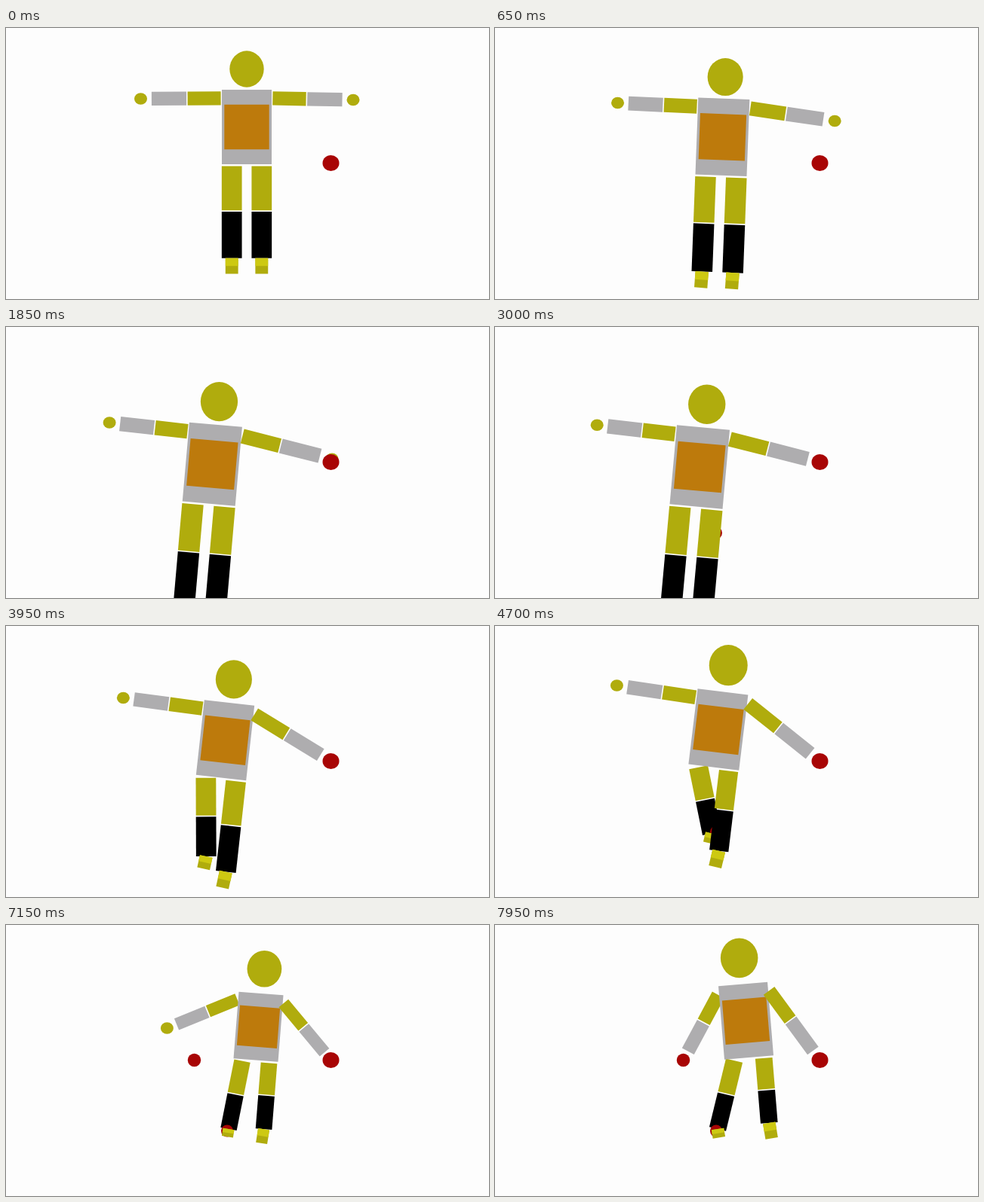
An HTML page with a canvas that plays this animation: 640x360 px, repeating every 8 s.

```html
<!DOCTYPE html>
<html lang="en">
<head>
<meta charset="utf-8">
<title>Reaching figure</title>
<style>
html, body { margin: 0; width: 100%; height: 100%; overflow: hidden; background: #fdfdfd; }
canvas { display: block; width: 100vw; height: 100vh; }
</style>
</head>
<body>
<canvas id="stage" width="640" height="360"></canvas>
<script>
const ctx = document.getElementById('stage').getContext('2d');

const LOOP = 8000, STEP = 50, MOVE = 1950;
const SKIN = '#b0ac0d', LIT = '#cdc912', GREY = '#aeadaf';
const GOLD = '#bd7a0c', RED = '#a80505', BLACK = '#000';

// Balls the figure reaches for, one per move.
const BALL_R = [430.5, 179.5], BALL_FOOT = [293, 273.5], BALL_L = [249.5, 179.5];
const HAND_R = [460, 95.5];

// Body poses: chest top x, y, hip middle x, y, neck length, leg stretch.
const POSES = [
  [319, 82, 319, 181, 27.5, 1],
  [289, 111, 282, 215, 30, 1],
  [276, 133.5, 266.5, 238.5, 31, 1],
  [296, 102, 285, 201.5, 31.5, .98],
  [302, 84.5, 289.5, 186, 38, .8],
  [338, 91, 331, 179.5, 33, .81],
  [328.5, 78.5, 336.5, 176, 35, .72]
];
const MIDDLES = [1300, 950, 1150];

const mix = (a, b, k) => a.map((v, i) => v + (b[i] - v) * k);
const progress = (t, from) => Math.min(1, Math.max(0, (t - from) / MOVE));

// Smooth curve through the three poses of the current move, then a hold.
function bodyAt(t) {
  const n = Math.min(2, Math.floor(t / 3000));
  const x = Math.min(t - n * 3000, MOVE), m = MIDDLES[n];
  const w = [(x - m) * (x - MOVE) / (m * MOVE), x * (x - MOVE) / (m * (m - MOVE)), x * (x - m) / (MOVE * (MOVE - m))];
  const [tx, ty, hx, hy, neck, leg] = POSES[0].map((_, i) =>
    w.reduce((sum, k, j) => sum + k * POSES[n * 2 + j][i], 0));

  const size = Math.hypot(hx - tx, hy - ty);
  const dx = (hx - tx) / size, dy = (hy - ty) / size;
  const from = (x0, y0) => (side, down) =>
    [x0 + dy * side + dx * down, y0 - dx * side + dy * down];
  return { size, neck, leg, lean: -dx, chest: from(tx, ty), hip: from(hx, hy) };
}

function poly(points, fill) {
  ctx.fillStyle = fill;
  ctx.beginPath();
  points.forEach(p => ctx.lineTo(...p));
  ctx.closePath();
  ctx.fill();
}

function oval([x, y], rx, ry, fill) {
  ctx.fillStyle = fill;
  ctx.beginPath();
  ctx.ellipse(x, y, rx, ry, 0, 0, Math.PI * 2);
  ctx.fill();
}

// Bar along a line, trimmed at either end.
function bar(a, b, width, fill, trimA = 0, trimB = 0) {
  const len = Math.hypot(b[0] - a[0], b[1] - a[1]) || 1;
  const ux = (b[0] - a[0]) / len, uy = (b[1] - a[1]) / len;
  const at = (along, side) => [a[0] + ux * along - uy * side, a[1] + uy * along + ux * side];
  const h = width / 2, end = len - trimB;
  poly([at(trimA, h), at(end, h), at(end, -h), at(trimA, -h)], fill);
}

function limb(root, joint, end, width, lower) {
  bar(root, joint, width, SKIN, 0.5, 0.8);
  bar(joint, end, width, lower, 0.8);
}

function arm(body, side, hand) {
  const root = body.chest(side * body.size * .342, body.size * .115);
  limb(root, mix(root, hand, .425), mix(root, hand, .865), body.size * .185, GREY);
}

function leg(body, side, ankle) {
  const root = body.hip(side * body.size * .2, 2);
  limb(root, mix(root, ankle, .49), ankle, body.size * .27 * (.5 + body.leg / 2), BLACK);
}

function foot(body, heel, stretch) {
  const length = body.size * .21 * stretch, width = body.size * .17;
  const toe = [heel[0] - body.lean * 2 * length, heel[1] + length];
  bar(heel, toe, width, SKIN);
  bar(heel, mix(heel, toe, .5), width, LIT);
}

function shirt(body) {
  const { size, chest } = body;
  const box = (half, top, bottom) =>
    [chest(-half, top), chest(half, top), chest(half, bottom), chest(-half, bottom)];
  poly(box(size / 3, 0, size), GREY);
  poly(box(size * .3, size * .2, size * .8), GOLD);
}

// Straight out from the chest, rising as the body leans.
function restingHand(body) {
  return body.chest(-140.5, 12 - body.lean * 28);
}

function draw(t) {
  const body = bodyAt(t);
  const [reachR, plant, reachL] = [0, 3000, 6000].map(from => progress(t, from));

  const handR = mix(HAND_R, BALL_R, reachR);
  const handL = mix(restingHand(bodyAt(Math.min(t, 6000))), BALL_L, reachL);
  const drop = body.size * 1.26 * body.leg;
  const ankleR = body.hip(body.size * .2, drop);
  const ankleL = mix(body.hip(-body.size * .2, drop), [295, 271], plant ** 1.6);

  ctx.fillStyle = '#fdfdfd';
  ctx.fillRect(0, 0, 640, 360);

  leg(body, -1, ankleL);
  if (t >= 3000) oval(BALL_FOOT, 8, 8, RED);
  foot(body, ankleL, 1 - plant * .45);
  leg(body, 1, ankleR);
  foot(body, ankleR, 1);

  arm(body, -1, handL);
  shirt(body);
  arm(body, 1, handR);

  const r = body.size * .155 + body.neck * .32;
  oval(body.chest(body.lean * body.neck * .7, -body.neck), r * .94, r, SKIN);

  oval(handL, 8.5, 7.7, SKIN);
  oval(handR, 8.5, 7.7, SKIN);
  if (t >= 6000) oval(BALL_L, 8.7, 8.7, RED);
  oval(BALL_R, 11, 10.5, RED);
}

const start = performance.now();
function tick() {
  const t = (performance.now() - start) % LOOP;
  draw(Math.floor(t / STEP) * STEP);
  requestAnimationFrame(tick);
}
tick();
</script>
</body>
</html>
```
